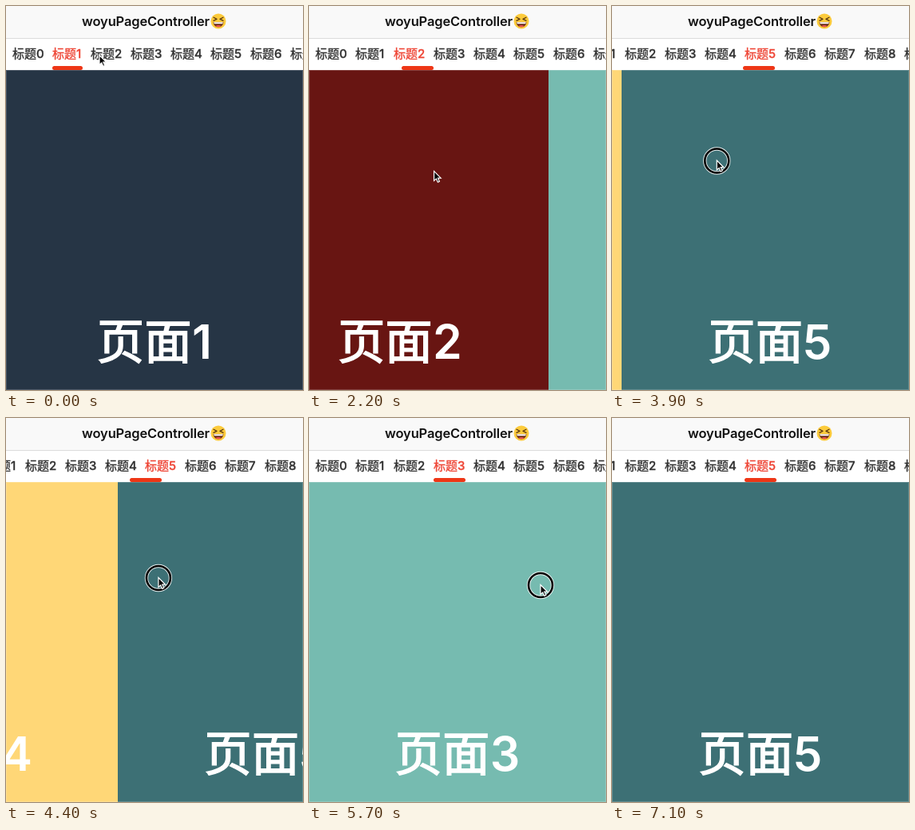
Write an HTML page that moves like this. It is 372 px wide and 480 px high and loops after 7.2 s.

```html
<!DOCTYPE html>
<html lang="zh-CN">
<head>
<meta charset="utf-8">
<title>woyuPageController</title>
<style>
  html, body { margin: 0; width: 100%; height: 100%; overflow: hidden; }
  body { position: relative; background: #fff; font-family: Inter, "Noto Sans CJK SC", "Noto Sans CJK", sans-serif; }
  #stage { position: absolute; left: 0; top: 0; width: 372px; height: 480px; overflow: hidden; }
  #stage div, #stage svg { position: absolute; }
  #nav { width: 372px; height: 40px; background: #f9f9f9; border-bottom: 1px solid #dcdcdc; }
  #nav div { left: 95px; top: 0; font: 600 16.5px/38px Inter, sans-serif; letter-spacing: -.14px; white-space: nowrap; color: #111; }
  #face { left: 256px; top: 9px; }
  #tabs { top: 41px; width: 372px; height: 39px; background: #fff; overflow: hidden; }
  #strip { left: 0; top: 0; }
  .tab { top: 0; font-size: 15px; font-weight: 500; line-height: 37px; white-space: nowrap; color: #303030; -webkit-text-stroke: .35px; }
  .tab.on { color: #ee4434; }
  #bar { top: 34px; height: 5px; border-radius: 2.5px; background: #ee3616; }
  #pages { top: 80px; width: 372px; height: 400px; overflow: hidden; }
  #pages::after { content: ""; position: absolute; inset: 0; box-shadow: inset 0 0 0 1px rgba(255, 255, 255, .18); }
  .page { width: 372px; height: 400px; color: #fff; font-size: 59px; text-align: center; white-space: nowrap; }
  .page div { left: 0; width: 372px; top: 296px; line-height: 88px; }
  .page span { font-weight: 400; letter-spacing: .4px; -webkit-text-stroke: 1.7px; }
  .page b { font-weight: 600; }
  #pointer { left: 0; top: 0; overflow: visible; }
</style>
</head>
<body>
<div id="stage">
  <div id="nav">
    <div>woyuPageController</div>
    <svg id="face" width="20" height="20" viewBox="0 0 20 20">
      <circle cx="10" cy="10" r="9.5" fill="#fccb3c"/>
      <path d="M4 5.2 8 7.4 4 9.4M16 5.2 12 7.4 16 9.4" fill="none" stroke="#5c3a12" stroke-width="1.3" stroke-linecap="round" stroke-linejoin="round"/>
      <path d="M3.6 11H16.4C16 19.4 4 19.4 3.6 11Z" fill="#6b2d16"/>
      <path d="M4.2 11.2H15.8L15.3 13.2H4.7Z" fill="#fff"/>
      <path d="M6.3 16Q10 13.8 13.7 16Q10 18.4 6.3 16Z" fill="#ef5350"/>
    </svg>
  </div>
  <div id="tabs"><div id="strip"><div id="bar"></div></div></div>
  <div id="pages"></div>
  <svg id="pointer" width="1" height="1">
    <g id="ring" fill="none">
      <circle r="15" stroke="#fff" stroke-width="4.4" stroke-opacity=".85"/>
      <circle r="15" stroke="#000" stroke-width="2.6"/>
    </g>
    <path d="M0 -.5V11.5L2.8 9 4.8 13.4 6.8 12.5 4.9 8.2H8.6Z" fill="#000" stroke="#fff" stroke-width="1.2"/>
  </svg>
</div>
<script>
const LOOP = 7200, STEP = 100, WIDTH = 372, PITCH = 50;
const DRAG = 162, LIFT = 16; // pointer travel for one page
const COLORS = { 1: '#263545', 2: '#681512', 3: '#76bbb0', 4: '#ffd777', 5: '#3d7075' };

// Each gesture: press time, duration, page reached, press point
const GESTURES = [
  { at: 600, span: 400, to: 2, x: 117, y: 62, tap: true },
  { at: 1700, span: 500, to: 2.194, x: 188, y: 210 },
  { at: 2400, span: 300, to: 3, x: 157, y: 207 },
  { at: 2800, span: 300, to: 4, x: 285, y: 209 },
  { at: 3200, span: 785, to: 5, x: 288, y: 209 },
  { at: 4150, span: 600, to: 4, x: 130, y: 206 },
  { at: 4935, span: 700, to: 3, x: 178, y: 206 },
  { at: 5700, span: 600, to: 4, x: 290, y: 209 },
  { at: 6400, span: 600, to: 5, x: 228, y: 211 }
];

const $ = id => document.getElementById(id);
const mix = (a, b, k) => a + (b - a) * k;
const clamp = k => Math.min(1, Math.max(0, k));
const smooth = k => (k = clamp(k), k * k * (3 - 2 * k));

function add(parent, cls, html) {
  const el = document.createElement('div');
  el.className = cls;
  el.innerHTML = html;
  return parent.appendChild(el);
}

const tabLeft = i => PITCH * i + (i < 2 ? 8 : 6);
const tabWidth = i => i === 1 ? 38 : 40;
const scrollFor = i => Math.max(0, PITCH * i - 160);

const tabs = Array.from({ length: 10 }, (_, i) => {
  const tab = add($('strip'), 'tab', '标题' + i);
  tab.style.left = tabLeft(i) + 'px';
  return tab;
});
const pages = Object.keys(COLORS).map(n => {
  const el = add($('pages'), 'page', `<div><span>页面</span><b>${n}</b></div>`);
  el.style.background = COLORS[n];
  return { n: +n, el };
});

function stateAt(t) {
  let page = 1, x = GESTURES[0].x, y = GESTURES[0].y, free = 0;
  for (const g of GESTURES) {
    if (t < g.at) {
      const k = smooth((t - free) / (g.at - free));
      return { page, x: mix(x, g.x, k), y: mix(y, g.y, k), pressed: false };
    }
    const k = smooth((t - g.at) / g.span);
    const moved = (g.to - page) * k;
    page += moved;
    x = g.x - (g.tap ? 0 : moved * DRAG);
    y = g.y - (g.tap ? 0 : Math.abs(moved) * LIFT);
    free = g.at + g.span;
    if (t < free) return { page, x, y, pressed: true };
  }
  return { page, x, y, pressed: false, gone: true };
}

function draw(t) {
  const { page, x, y, pressed, gone } = stateAt(t);
  const i = Math.floor(page), k = page - i;
  const scroll = mix(scrollFor(i), scrollFor(i + 1), smooth((k - .4) / .3));
  pages.forEach(({ n, el }) => {
    el.style.transform = `translateX(${Math.round((n - page) * WIDTH)}px)`;
  });
  tabs.forEach((tab, n) => tab.classList.toggle('on', n === Math.round(page)));
  $('strip').style.transform = `translateX(${-scroll}px)`;
  $('bar').style.left = mix(tabLeft(i), tabLeft(i + 1), k) + 'px';
  $('bar').style.width = mix(tabWidth(i), tabWidth(i + 1), k) + 'px';
  $('pointer').style.transform = `translate(${x}px, ${y}px)`;
  $('pointer').style.visibility = gone ? 'hidden' : 'visible';
  $('ring').style.display = pressed ? '' : 'none';
}

function tick() {
  draw(Math.floor(performance.now() % LOOP / STEP) * STEP);
  requestAnimationFrame(tick);
}
tick();
</script>
</body>
</html>
```
